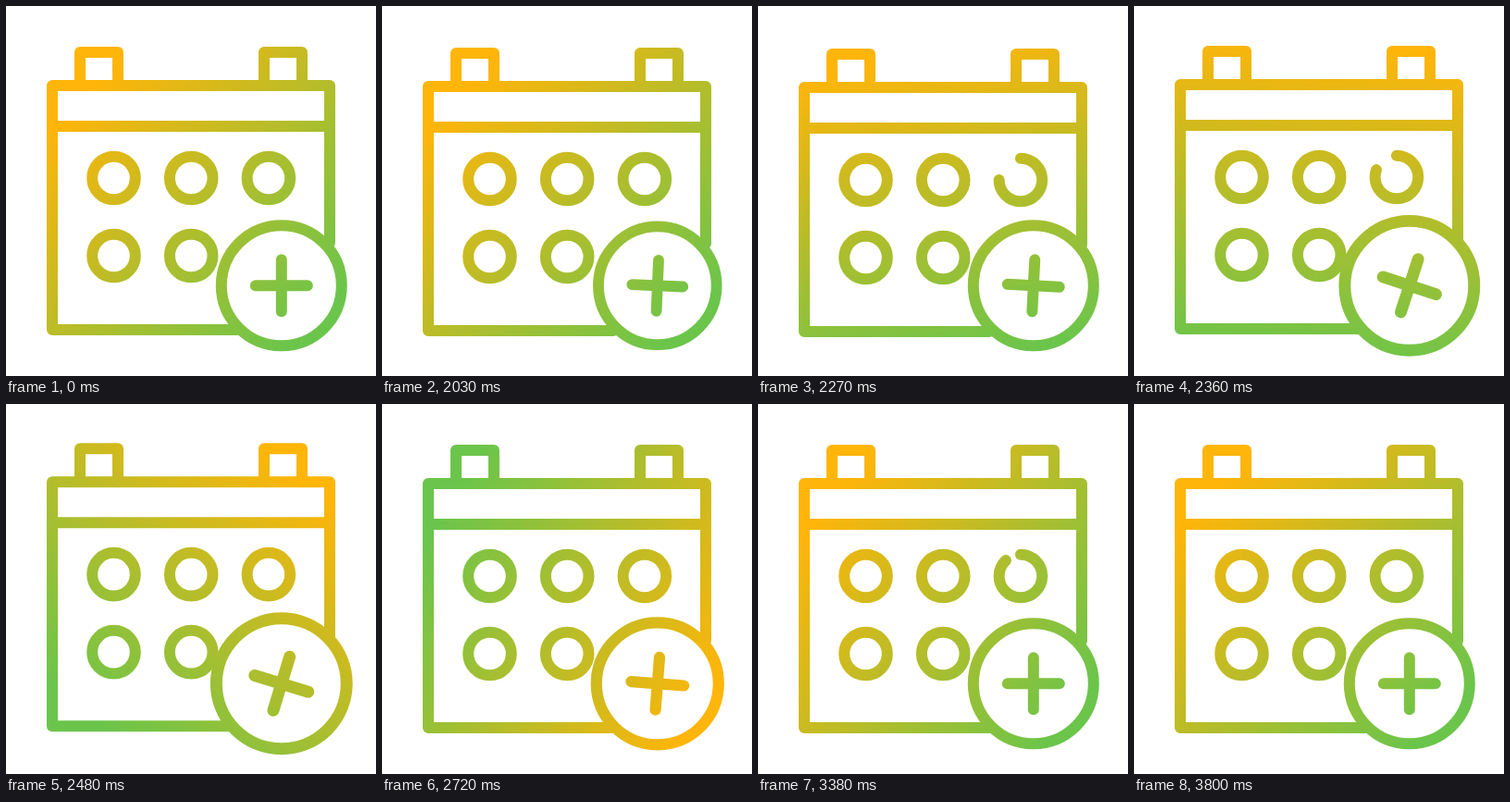
Recreate the animation shown at these times as an HTML page with a canvas. Size 400 by 400 pixels, loop 3.83 s.

```html
<!DOCTYPE html>
<html lang="en">
<head>
<meta charset="utf-8">
<title>Calendar icon</title>
<style>
  html, body { margin: 0; width: 100%; height: 100%; overflow: hidden; background: #fff; }
  canvas { display: block; width: 100vw; height: 100vh; }
</style>
</head>
<body>
<canvas id="stage"></canvas>
<script>
const SIZE = 400, LOOP = 3830, REST = 2030, STEP = 30;
const YELLOW = '#ffb509', GREEN = '#6bc54b';
const TURN = Math.PI * 2, DEG = Math.PI / 180;
const canvas = document.getElementById('stage');
const ctx = canvas.getContext('2d');

function smooth(u) {
  u = Math.min(1, Math.max(0, u));
  return u * u * (3 - 2 * u);
}

// Half a sine wave between two times, zero outside
function bump(t, from, to) {
  return t > from && t < to ? Math.sin(Math.PI * (t - from) / (to - from)) : 0;
}

// Quick rise to 1 and a slow decay; peaks `rise` ms after `from`
function pop(t, from, rise) {
  const x = Math.max(0, t - from) / rise;
  return (x * Math.exp(1 - x)) ** 2;
}

const lift = t => 3.6 * bump(t, 0, 330) - 2.5 * pop(t, 330, 90);
const scale = t => 1 - .05 * bump(t, 0, 270) + .095 * pop(t, 270, 150);
const spin = t => 90 * smooth(t / 300) + 19.5 * pop(t, 225, 180);
const sweep = t => 360 * smooth(t / 1520);
const gap = t => .25 * (bump(t, 60, 480) + bump(t, 1300, 1800));

function paint(degrees) {
  const c = 213, half = 174, a = (225 + degrees) * DEG;
  const dx = Math.cos(a) * half, dy = Math.sin(a) * half;
  const g = ctx.createLinearGradient(c + dx, c + dy, c - dx, c - dy);
  g.addColorStop(0, YELLOW);
  g.addColorStop(1, GREEN);
  return g;
}

function line(...p) {
  ctx.beginPath();
  for (let i = 0; i < p.length; i += 2) ctx.lineTo(p[i], p[i + 1]);
  ctx.stroke();
}

function ring(x, y, r, open = 0) {
  ctx.beginPath();
  ctx.arc(x, y, r, -TURN / 4, -TURN / 4 + TURN * (1 - open));
  if (open < .001) ctx.closePath();
  ctx.stroke();
}

function calendar(y, open) {
  // The lower right corner stays free for the badge
  line(350, y + 256, 350, y + 86, 50, y + 86, 50, y + 350, 250, y + 350);
  line(50, y + 130, 350, y + 130);
  for (const x of [80, 279]) line(x, y + 86, x, y + 50, x + 41, y + 50, x + 41, y + 86);
  for (let i = 0; i < 5; i++) {
    ring(116.5 + 83.7 * (i % 3), y + (i < 3 ? 186 : 270), 23.3, i === 2 ? open : 0);
  }
}

function badge(size, degrees) {
  const x = 297.8, y = 302.3, arm = 28 * size;
  ctx.lineWidth = 12 * size;
  ctx.beginPath();
  ctx.arc(x, y, 65 * size, 0, TURN);
  ctx.fillStyle = '#fff';
  ctx.fill();
  ctx.stroke();
  for (const a of [degrees * DEG, (degrees + 90) * DEG]) {
    const dx = Math.cos(a) * arm, dy = Math.sin(a) * arm;
    line(x - dx, y - dy, x + dx, y + dy);
  }
}

function draw(ms) {
  const t = ms < REST ? 0 : STEP * (1 + Math.floor((ms - REST) / STEP));
  const w = Math.round(innerWidth * devicePixelRatio);
  const h = Math.round(innerHeight * devicePixelRatio);
  if (canvas.width !== w || canvas.height !== h) {
    canvas.width = w;
    canvas.height = h;
  }
  ctx.setTransform(w / SIZE, 0, 0, h / SIZE, 0, 0);
  ctx.fillStyle = '#fff';
  ctx.fillRect(0, 0, SIZE, SIZE);
  ctx.lineWidth = 12;
  ctx.lineCap = ctx.lineJoin = 'round';
  ctx.strokeStyle = paint(sweep(t));
  calendar(lift(t), gap(t));
  badge(scale(t), spin(t));
}

const start = performance.now();
function tick() {
  draw((performance.now() - start) % LOOP);
  requestAnimationFrame(tick);
}
tick();
</script>
</body>
</html>
```
